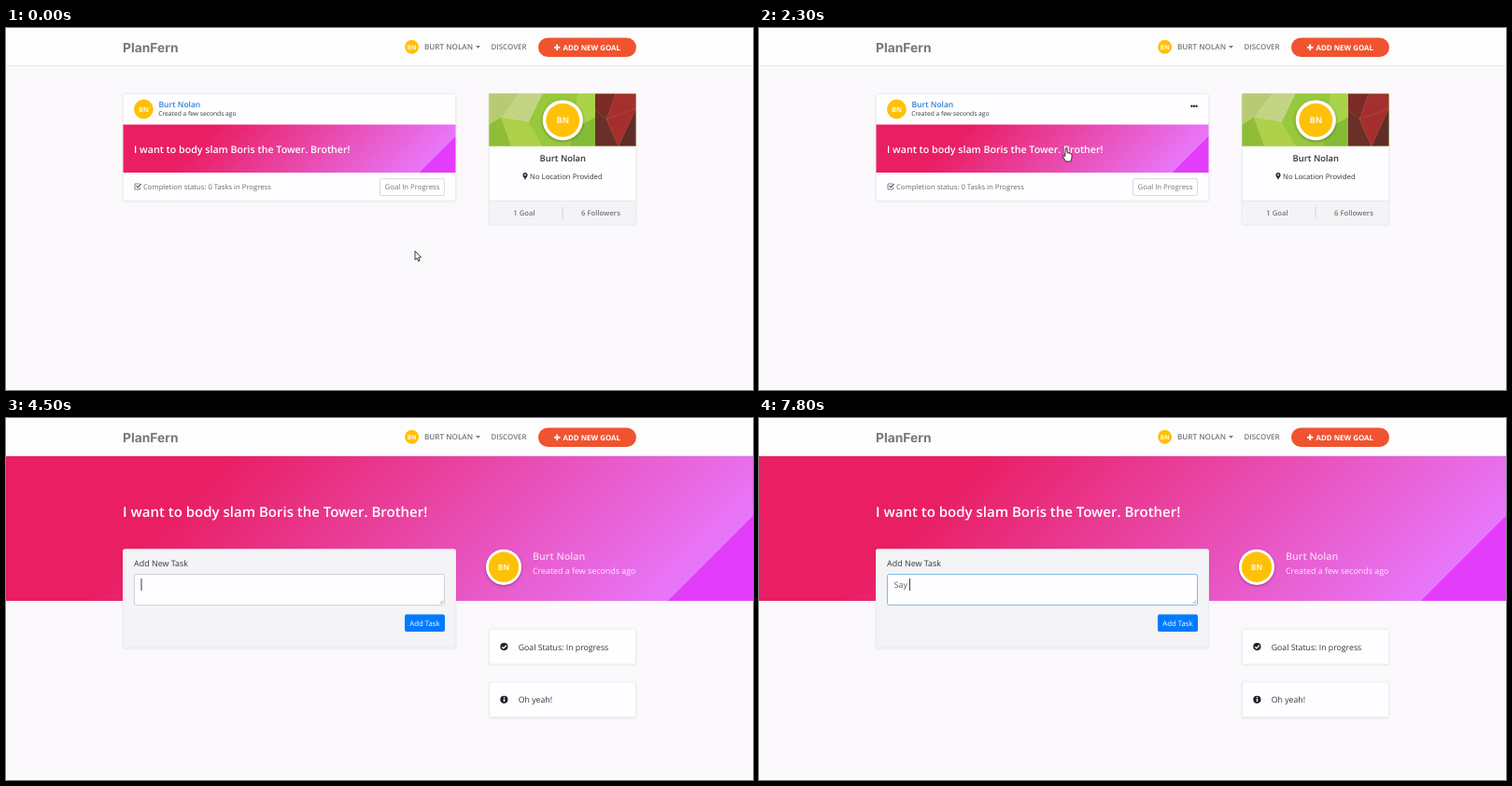
An HTML page with a canvas that plays this animation: 800x388 px, repeating every 8000 ms.

```html
<!DOCTYPE html>
<html lang="en">
<head>
<meta charset="utf-8">
<title>Goal page</title>
<style>
  html, body { margin: 0; width: 100%; height: 100%; overflow: hidden; background: #fbf9fc; }
  canvas { display: block; width: 800px; height: 388px; }
</style>
</head>
<body>
<canvas id="stage"></canvas>
<script>
const W = 800, H = 388, LOOP = 8000, STEP = 100;
const SANS = '"Open Sans", "Noto Sans", sans-serif';
const USER = 'Burt Nolan', INITIALS = 'BN';
const GOAL = 'I want to body slam Boris the Tower. Brother!';
const AGE = 'Created a few seconds ago';
const AMBER = '#ffc107', ORANGE = '#f0532f', GREY = '#757579', INK = '#35353a';

const canvas = document.getElementById('stage');
const ctx = canvas.getContext('2d');
const dpr = window.devicePixelRatio || 1;
canvas.width = W * dpr;
canvas.height = H * dpr;
ctx.textRendering = 'geometricPrecision';

function text(s, x, y, size, color, weight = 400, align = 'left', family = SANS) {
  ctx.font = `${weight} ${size}px ${family}`;
  ctx.textAlign = align;
  ctx.fillStyle = color;
  ctx.fillText(s, x, y);
}

function rect(x, y, w, h, color) {
  ctx.fillStyle = color;
  ctx.fillRect(x, y, w, h);
}

function box(x, y, w, h, r, fill, stroke) {
  ctx.beginPath();
  ctx.roundRect(x, y, w, h, r);
  ctx.fillStyle = fill;
  ctx.fill();
  if (stroke) {
    ctx.strokeStyle = stroke;
    ctx.lineWidth = 1;
    ctx.stroke();
  }
}

function disc(x, y, r, color) {
  ctx.beginPath();
  ctx.arc(x, y, r, 0, Math.PI * 2);
  ctx.fillStyle = color;
  ctx.fill();
}

function trace(points, close) {
  ctx.beginPath();
  for (let i = 0; i < points.length; i += 2) ctx.lineTo(points[i], points[i + 1]);
  if (close) ctx.closePath();
}

function poly(points, color) {
  trace(points, true);
  ctx.fillStyle = color;
  ctx.fill();
}

function line(points, color, width = 1) {
  trace(points, false);
  ctx.strokeStyle = color;
  ctx.lineWidth = width;
  ctx.stroke();
}

function withShadow(blur, dy, color, draw) {
  ctx.save();
  ctx.shadowBlur = blur * dpr;
  ctx.shadowOffsetY = dy * dpr;
  ctx.shadowColor = color;
  draw();
  ctx.restore();
}

function card(x, y, w, h, fill = '#fefdff') {
  withShadow(2, .8, 'rgba(0,0,0,.1)', () => box(x, y, w, h, 2, fill));
  box(x + .5, y + .5, w - 1, h - 1, 2, fill, '#eeedf0');
}

// Diagonal blend with a hard edge at 90 %
function goalBand(x, y, w, h) {
  const d = (w + h) / 2;
  const g = ctx.createLinearGradient(x, y, x + d, y + d);
  g.addColorStop(0, '#e91e63');
  g.addColorStop(.25, '#e91e63');
  g.addColorStop(.904, '#e877fb');
  g.addColorStop(.905, '#e43cfb');
  g.addColorStop(1, '#e43cfb');
  rect(x, y, w, h, g);
}

function avatar(x, y, r, size, ring = 0) {
  if (ring) withShadow(3, 1, 'rgba(0,0,0,.35)', () => disc(x, y, r + ring, '#fff'));
  disc(x, y, r, AMBER);
  text(INITIALS, x, y + size * .36, size, '#fff8e0', 700, 'center');
}

function header(signedIn) {
  rect(0, 0, W, 40, '#fefdfe');
  rect(0, 40, W, 1, '#e6e5e8');
  text('PlanFern', 125, 25.5, 13.8, '#77777a', 700, 'left', 'Inter, sans-serif');
  if (!signedIn) {
    text('DISCOVER', 560, 23.3, 7.95, GREY, 600);
    box(610, 10.5, 65, 20.5, 10.2, ORANGE);
    text('SIGN IN', 642.7, 23.6, 7.9, '#fff', 700, 'center');
    return;
  }
  avatar(434.6, 20.3, 7.5, 6.6);
  text(USER.toUpperCase(), 448, 23.3, 8.1, GREY, 600);
  poly([503, 19, 508, 19, 505.5, 21.7], GREY);
  text('DISCOVER', 519.5, 23.3, 7.95, GREY, 600);
  box(570, 10.5, 105, 20.5, 10.2, ORANGE);
  line([587, 20.8, 593.4, 20.8], '#fff', 1.9);
  line([590.2, 17.6, 590.2, 24], '#fff', 1.9);
  text('ADD NEW GOAL', 596.5, 23.6, 7.9, '#fff', 700);
}

function banner() {
  const shapes = [
    ['#b9cb72', [517, 70, 549, 70, 530, 96, 517, 104]],
    ['#c3d585', [549, 70, 575, 70, 560, 101, 530, 96]],
    ['#8fbd38', [517, 104, 530, 96, 541, 127, 517, 127]],
    ['#aed04a', [530, 96, 560, 101, 575, 127, 541, 127]],
    ['#98c83c', [575, 70, 612, 70, 604, 127, 575, 127, 560, 101]],
    ['#a9d348', [612, 70, 631, 70, 631, 96, 608, 108]],
    ['#86bb35', [608, 108, 631, 96, 631, 127, 604, 127]],
    ['#7c2a28', [631, 70, 653, 70, 643, 98, 631, 88]],
    ['#a52f2e', [653, 70, 675, 70, 675, 86, 643, 98]],
    ['#6b2f29', [631, 88, 643, 98, 656, 127, 631, 127]],
    ['#a62e2e', [643, 98, 675, 86, 656, 127]],
    ['#5f2c28', [675, 86, 675, 127, 656, 127]]
  ];
  ctx.save();
  ctx.beginPath();
  ctx.rect(517.5, 70.5, 157, 56);
  ctx.clip();
  rect(517, 70, 158, 57, '#9ccb3b');
  for (const [color, points] of shapes) poly(points, color);
  ctx.restore();
}

function goalCard(hover) {
  card(125, 70, 357, 115.5);
  avatar(147.4, 87, 10.4, 7.4);
  text(USER, 163.5, 84.7, 8.5, '#2e82d4', 600);
  text(AGE, 163.3, 94, 6.7, INK);
  if (hover) for (const x of [463.4, 466, 468.6]) disc(x, 83.7, 1.2, '#2c2c30');
  goalBand(125.5, 103.5, 356, 51.5);
  text(GOAL, 137, 134.2, 10.65, '#fff', 600);
  line([143, 167, 138, 167, 138, 173, 143.6, 173, 143.6, 170.8], '#66666a', .8);
  line([139.6, 169.2, 141.2, 170.9, 144.6, 167.2], '#55555a', 1.2);
  text('Completion status: 0 Tasks in Progress', 147, 173, 7.7, '#69696d');
  box(400.5, 161.5, 69, 18, 1.5, '#fefdff', '#dcdbdf');
  text('Goal In Progress', 435, 173.3, 7.75, '#77777b', 400, 'center');
}

function profileCard() {
  card(517, 70, 158, 140.5);
  banner();
  avatar(596.3, 98.8, 18, 9.2, 3.6);
  text(USER, 596.3, 143, 9.4, INK, 600, 'center');
  disc(556, 157.4, 2.5, '#28282c');
  poly([553.7, 158.3, 558.3, 158.3, 556, 162.8], '#28282c');
  disc(556, 157.4, .9, '#fff');
  text('No Location Provided', 561, 162, 7.8, INK);
  rect(518, 185.5, 156, 24.5, '#f4f3f6');
  rect(518, 185, 156, 1, '#e6e5e9');
  rect(595.5, 191.5, 1, 13, '#d2d1d6');
  text('1 Goal', 555, 201, 7.7, GREY, 600, 'center');
  text('6 Followers', 637, 201, 7.7, GREY, 600, 'center');
}

function taskForm(focus, typed, caret) {
  card(125, 140.5, 357, 106, '#f4f3f5');
  text('Add New Task', 137, 159, 8.95, INK);
  box(137.5, 167.5, 332, 33, 2, '#fefdff', '#d2d1d6');
  if (focus) box(137.5, 167.5, 332, 33, 2, '#fefdff', `rgba(128,186,228,${focus})`);
  line([464.5, 199, 468, 195.5], '#8a8a8e', .7);
  line([466.5, 199, 468, 197.5], '#8a8a8e', .7);
  text(typed, 144.7, 181.6, 8.8, '#55555a');
  if (caret) rect(144.5 + ctx.measureText(typed).width, 172, 1, 13, '#3c3c40');
  box(427, 210.5, 43, 18.5, 2, '#007bff');
  text('Add Task', 448.5, 222.7, 7.8, '#fff', 400, 'center');
}

function note(y, label) {
  card(517, y, 158, 38.5);
  disc(533.4, y + 19.3, 4.1, '#212125');
  text(label, 548.7, y + 22.7, 8.75, INK);
}

function goalList(hover) {
  header(true);
  goalCard(hover);
  profileCard();
}

function goalDetail(signedIn, focus, typed, caret) {
  header(signedIn);
  goalBand(0, 41, W, 155);
  text(GOAL, 125, 106, 15, '#fff', 600);
  taskForm(focus, typed, caret);
  avatar(533, 159.8, 16.2, 8.4, 2.9);
  text(USER, 564, 151.9, 10.7, 'rgba(255,255,255,.72)', 600);
  text(AGE, 564, 166.6, 8.9, 'rgba(255,255,255,.88)');
  note(225.8, 'Goal Status: In progress');
  line([531.3, 245.3, 532.9, 246.9, 535.8, 243.7], '#fff', 1.3);
  note(282.5, 'Oh yeah!');
  rect(532.8, 299, 1.4, 1.3, '#fff');
  rect(532.8, 301.1, 1.4, 3, '#fff');
}

function pointer(x, y, hand) {
  ctx.save();
  ctx.translate(x, y);
  ctx.lineJoin = 'round';
  if (hand) {
    trace([-.7, .3, .7, .3, 1.3, 5, 3, 5, 4.6, 5.5, 6, 6.3, 6, 10, 5, 14,
           -.3, 14, -3.6, 9, -3.2, 7.6, -1.3, 8.6], true);
  } else {
    trace([0, 0, 0, 9.4, 2.1, 7.5, 3.6, 11, 5.2, 10.3, 3.7, 7, 6.5, 6.8], true);
  }
  ctx.fillStyle = '#fff';
  ctx.fill();
  ctx.strokeStyle = '#25252a';
  ctx.lineWidth = .9;
  ctx.stroke();
  ctx.restore();
}

const clamp = v => Math.min(1, Math.max(0, v));
const ease = v => v * v * (3 - 2 * v);
const mix = (a, b, v) => a + (b - a) * v;

function caretOn(t) {
  if (t < 4500) return false;
  if (t >= 7400) return true;
  return [5100, 5600, 6100, 6700, 7200].filter(at => t >= at).length % 2 === 0;
}

function typedAt(t) {
  const count = t >= 7800 ? 4 : t >= 7500 ? 3 : t >= 7400 ? 2 : 0;
  return 'Say '.slice(0, count);
}

function render(time) {
  const t = Math.floor(time % LOOP / STEP) * STEP;
  ctx.setTransform(dpr, 0, 0, dpr, 0, 0);
  rect(0, 0, W, H, '#fbf9fc');
  if (t < 3100) {
    const k = ease(clamp(t / 700));
    const x = mix(438, 329, k), y = mix(239, 129, k);
    goalList(x < 482 && y < 185);
    pointer(x, y, y < 155 && t < 3000);
  } else {
    goalDetail(t >= 3200, clamp((t - 4500) / 200), typedAt(t), caretOn(t));
    const k = clamp((t - 4000) / 300);
    if (k < 1) pointer(mix(329, 318, k), mix(129, 180, k), false);
  }
}

function tick() {
  render(performance.now());
  requestAnimationFrame(tick);
}
tick();
</script>
</body>
</html>
```
